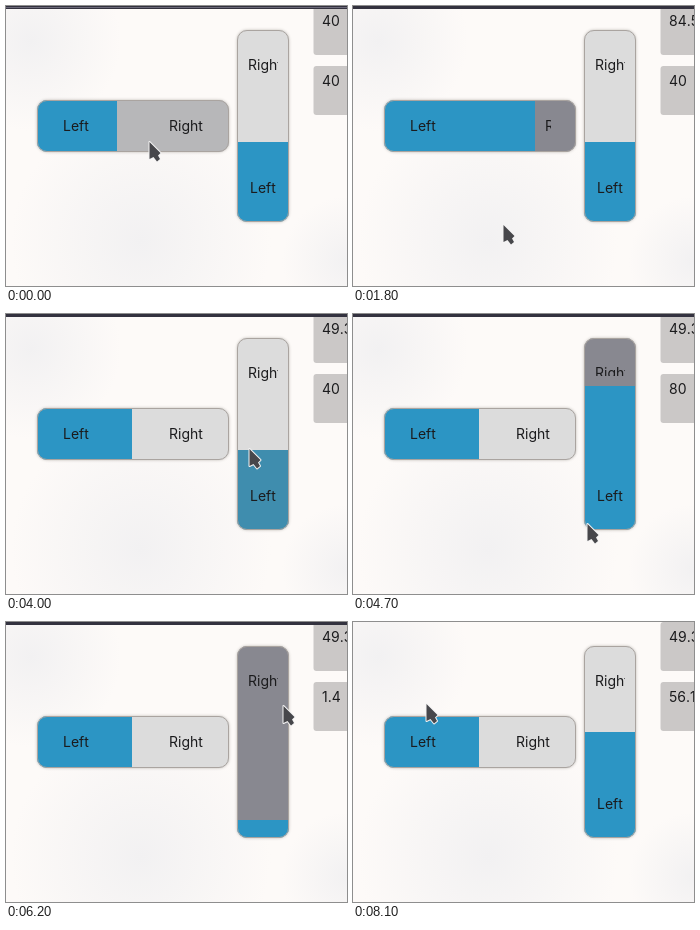
An HTML page with a canvas that plays this animation: 341x280 px, repeating every 8200 ms.

```html
<!DOCTYPE html>
<html>
<head>
<meta charset="utf-8">
<style>
html, body { margin: 0; overflow: hidden; }
canvas { display: block; }
</style>
</head>
<body>
<canvas id="stage" width="341" height="280"></canvas>
<script>
const ctx = document.getElementById('stage').getContext('2d');
const LOOP = 8200, STEP = 100;
const BLUE = '#2c95c4', BLUE_HOVER = '#3f8dae';
const GREY = '#dcdcdc', GREY_HOVER = '#b7b7b9', GREY_DRAG = '#888890';

// Turning points of the pointer: time in steps, x, y
const turns = [
  [0, 143, 136], [5, 112, 124], [8, 4.3, 214], [11, 123, 214], [15, 175, 219],
  [23, 109, 219], [26, -25, 217], [28, -25, 217], [33, 280, 216], [35, 198.9, 205],
  [40, 243, 135.4], [50, 230, 242], [56, 265, 179], [66, 285, 21.2], [68, 287, 91],
  [70, 285, 111], [73, 146, 33], [79, 51, -12], [81, 73, 82]
];

function pointerAt(step) {
  const next = Math.max(1, turns.findIndex(turn => turn[0] >= step));
  const [t0, x0, y0] = turns[next - 1], [t1, x1, y1] = turns[next];
  const k = (step - t0) / (t1 - t0);
  return { x: x0 + (x1 - x0) * k, y: y0 + (y1 - y0) * k };
}

const clamp = v => Math.min(100, Math.max(0, v));

// Relative dragging: every pointer move adds to the value, which stops at 0 and 100
const states = [];
for (let i = 0, last = pointerAt(0), h = 40, v = 40; i < LOOP / STEP; i++) {
  const p = pointerAt(i);
  const dragH = i > 5 && i < 36, dragV = i > 41 && i < 71;
  if (dragH) h = clamp(h + (p.x - last.x) / 1.6);
  if (dragV) v = clamp(v + (p.y - last.y) / 1.6);
  states.push({ ...p, h, v, dragH, dragV });
  last = p;
}

function rounded(x, y, w, h, r) {
  ctx.beginPath();
  ctx.roundRect(x, y, w, h, r);
}

function rect(color, x, y, w, h) {
  ctx.fillStyle = color;
  ctx.fillRect(x, y, w, h);
}

function clipped(x, y, w, h, draw) {
  ctx.save();
  ctx.beginPath();
  ctx.rect(x, y, Math.max(0, w), Math.max(0, h));
  ctx.clip();
  draw();
  ctx.restore();
}

function text(str, x, y) {
  ctx.fillStyle = '#1b1b1d';
  ctx.fillText(str, x, y);
}

function bar(x, y, w, h, drawInside) {
  ctx.save();
  ctx.shadowColor = 'rgba(70,60,50,.35)';
  ctx.shadowBlur = 3;
  ctx.fillStyle = GREY;
  rounded(x, y, w, h, 10);
  ctx.fill();
  ctx.restore();
  ctx.save();
  ctx.clip();
  drawInside();
  ctx.restore();
  ctx.strokeStyle = '#aaa4a0';
  ctx.lineWidth = 1;
  rounded(x + .5, y + .5, w - 1, h - 1, 9.5);
  ctx.stroke();
}

const leftColor = hover => hover ? BLUE_HOVER : BLUE;
const rightColor = (hover, drag) => drag ? GREY_DRAG : hover ? GREY_HOVER : GREY;

function horizontalBar(s) {
  const split = Math.round(47 + 1.6 * s.h);
  const over = !s.dragH && s.x >= 31 && s.x < 223 && s.y >= 94 && s.y < 146;
  bar(31, 94, 192, 52, () => {
    rect(leftColor(over && s.x < split), 31, 94, split - 31, 52);
    rect(rightColor(over && s.x >= split, s.dragH), split, 94, 223 - split, 52);
    clipped(57, 94, split - 67, 52, () => text('Left', 57, 125));
    const start = Math.max(163, split + 10);
    clipped(start, 94, 198 - start, 52, () => text('Right', start, 125));
  });
}

function verticalBar(s) {
  const split = Math.round(200 - 1.6 * s.v);
  const over = !s.dragV && s.x >= 231 && s.x < 283 && s.y >= 24 && s.y < 216;
  const onLeft = s.y + 2 >= split;
  bar(231, 24, 52, 192, () => {
    rect(rightColor(over && !onLeft, s.dragV), 231, 24, 52, split - 24);
    rect(leftColor(over && onLeft), 231, split, 52, 216 - split);
    clipped(241, 50, 31, split - 60, () => text('Right', 242, 64));
    const top = Math.max(173, split + 10);
    clipped(241, top, 32, 190 - top, () => text('Left', 244, top + 14));
  });
}

function label(value, y) {
  ctx.fillStyle = '#cbc8c7';
  rounded(307.5, y, 60, 49, 3);
  ctx.fill();
  text(String(+value.toFixed(1)), 316, y + 20);
}

const arrow = new Path2D('M.5 0V17L4.5 15 8 19.5 11 17 9 13.5 11.5 11z');

function pointer(x, y) {
  ctx.save();
  ctx.translate(Math.round(x), Math.round(y));
  ctx.lineJoin = 'round';
  ctx.strokeStyle = '#f4f3f3';
  ctx.lineWidth = 2;
  ctx.stroke(arrow);
  ctx.fillStyle = '#47474b';
  ctx.fill(arrow);
  ctx.restore();
}

function haze(x, y, r) {
  const glow = ctx.createRadialGradient(x, y, 0, x, y, r);
  glow.addColorStop(0, '#f2f1f2');
  glow.addColorStop(1, 'rgba(242,241,242,0)');
  rect(glow, 0, 0, 341, 280);
}

function background() {
  rect('#fdfaf8', 0, 0, 341, 280);
  haze(135, 235, 130);
  haze(25, 35, 90);
  haze(341, 255, 65);
}

function draw() {
  const i = Math.floor(performance.now() % LOOP / STEP);
  const s = states[i];
  ctx.font = '14px Inter, sans-serif';
  ctx.fontKerning = 'none';
  background();
  label(s.h, 0);
  label(s.v, 60);
  if (i < 80) rect('#33323f', 0, 0, 341, 3);
  if (i < 6) rect('#6a6878', 0, 1, 341, 1);
  horizontalBar(s);
  verticalBar(s);
  pointer(s.x, s.y);
  requestAnimationFrame(draw);
}
draw();
</script>
</body>
</html>
```
